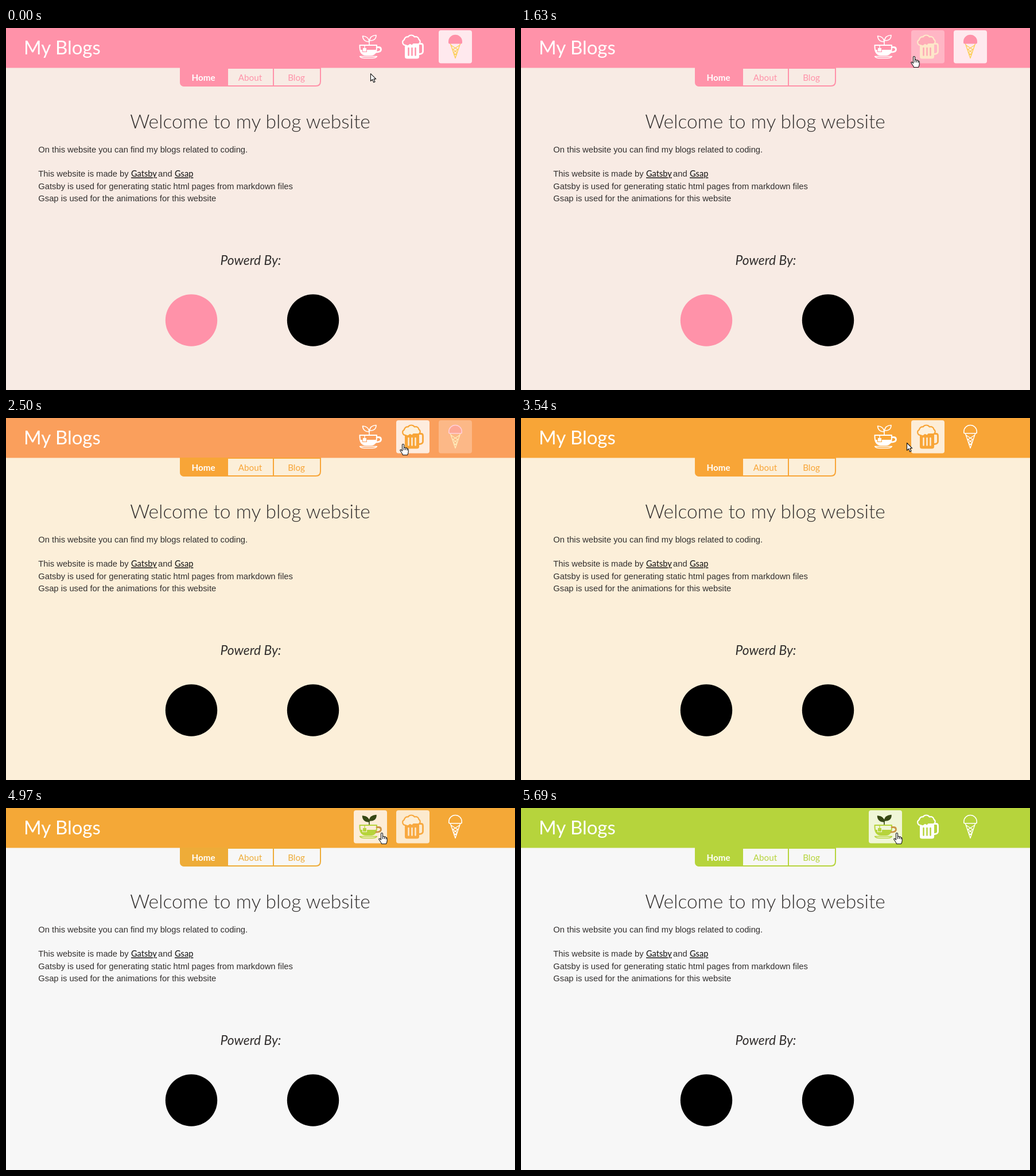
Write an HTML page that moves like this. It is 887 by 631 pixels and loops after 7.02 s.

```html
<!DOCTYPE html>
<html lang="en">
<head>
<meta charset="utf-8">
<title>My Blogs</title>
<style>
  html, body { margin: 0; width: 100%; height: 100%; overflow: hidden; }
  svg { display: block; width: 887px; height: 631px; }
  .deco { font-family: Lato, sans-serif; }
  .copy { font: 14.76px "Liberation Sans", Arial, sans-serif; fill: #322f2e; }
  .link { font: 14.6px Lato, sans-serif; fill: #111; text-decoration: underline; }
  .mid { text-anchor: middle; }
  .line { fill: none; stroke-linecap: round; stroke-linejoin: round; }
</style>
</head>
<body>
<svg viewBox="0 0 887 631">
  <rect id="page" width="887" height="631"/>
  <rect id="header" width="887" height="69.5"/>
  <text class="deco" x="31" y="46" font-size="33" fill="#fff">My Blogs</text>

  <g id="nav">
    <path d="M303 69H386V102H311Q303 102 303 94Z" fill="currentColor"/>
    <path d="M304 70H548V93Q548 101 540 101H312Q304 101 304 93ZM386 70V101M466 70V101"
      fill="none" stroke="currentColor" stroke-width="2"/>
    <g class="deco mid" font-size="15.2" fill="currentColor">
      <text x="344" y="91.5" fill="#fff" font-weight="700">Home</text>
      <text x="425.5" y="91.5">About</text>
      <text x="506" y="91.5">Blog</text>
    </g>
  </g>

  <g fill="#fff">
    <rect id="teaTile" x="606" y="4" width="58" height="57.5" rx="4"/>
    <rect id="beerTile" x="680" y="4" width="58" height="57.5" rx="4"/>
    <rect id="iceTile" x="754" y="4" width="58" height="57.5" rx="4"/>
  </g>

  <g id="tea" class="line" stroke-width="2">
    <g id="leaves" stroke-width="1.6">
      <path d="M633 24C625 24 622 20 621.5 14C629 14.500 632.500 18 633 24Z"/>
      <path d="M633.500 22C634 16 638 13 645 12.500C645 19 641 22.500 633.500 22Z"/>
      <path d="M633 22V29"/>
    </g>
    <path d="M616.500 30H646Q647 47 636 47H627Q616 47 616.500 30Z"/>
    <path id="brew" d="M617.500 38H621V42H629V38H645.500Q644 46.500 636 46.500H627Q618.500 46.500 617.500 38Z" stroke="none"/>
    <path d="M625 30V35" stroke-width="1.3"/>
    <rect id="tag" x="622" y="35" width="6" height="6" stroke="none"/>
    <path id="handle" d="M646 33.500H649Q653.500 33.500 653.500 37.500Q653.500 42 645 42" stroke-width="2.8"/>
    <path d="M616.500 49.500H646.500Q644 52.500 639 52.500H624Q619 52.500 616.500 49.500Z" stroke-width="1.4"/>
  </g>

  <g id="beer" class="line" stroke-width="2.2">
    <path id="mug" d="M695 29H720V50Q720 53.500 716 53.500H699Q695 53.500 695 50Z" stroke="none"/>
    <path d="M720 27.500H723.500Q726.500 27.500 726.500 31V41Q726.500 45 720.500 45.500" stroke-width="2.8"/>
    <path id="foam" d="M696 30A5 5 0 0 1 694 20.500A5.500 5.500 0 0 1 700.500 15.500A7 7 0 0 1 712 15.500A5.500 5.500 0 0 1 719.500 20A4.500 4.500 0 0 1 719 28H710Q708 32 704 29Q701 33 696 30Z"/>
    <path id="bars" d="M701.500 35V47.500M707.500 35V47.500M713.500 35V47.500" stroke-width="2.5"/>
  </g>

  <g id="ice" class="line" stroke-width="1.6">
    <path id="cone" d="M774.500 27.500L783 52.500L791.500 27.500M775.500 30L788 38M777.500 36.500L786.500 43M780 43.500L785 47.500M790.500 30L778 38M788.500 36.500L779.500 43M786 43.500L781 47.500" stroke-width="1.4"/>
    <path id="scoop" d="M773 26.800Q771.500 26.500 771.800 23.500A11.200 11 0 0 1 794.200 23.500Q794.500 26.500 793 26.800Z"/>
  </g>

  <g class="deco mid" fill="#322f2e">
    <text x="425.500" y="174.500" font-size="33.6" font-weight="300">Welcome to my blog website</text>
    <text x="426.500" y="412.500" font-size="22.800" font-style="italic">Powerd By:</text>
  </g>
  <g class="copy">
    <text x="56.300" y="216.700">On this website you can find my blogs related to coding.</text>
    <text x="56.300" y="259.400">This website is made by</text>
    <text x="265" y="259.400">and</text>
    <text x="56.300" y="280.700">Gatsby is used for generating static html pages from markdown files</text>
    <text x="56.300" y="302">Gsap is used for the animations for this website</text>
  </g>
  <text class="link" x="218" y="259.400">Gatsby</text>
  <text class="link" x="294" y="259.400">Gsap</text>

  <circle id="badge" cx="323" cy="509.500" r="45.200"/>
  <circle cx="535" cy="509.500" r="45.200"/>

  <circle id="ripple" r="9.500" fill="#e9ee3c"/>
  <g id="cursor" fill="#fff" stroke="#111" stroke-width="1.1" stroke-linejoin="round">
    <path id="arrow" d="M.5 .5V13.500L3.600 10.700L5.700 15.700L8 14.700L5.900 9.800H9.800Z"/>
    <path id="hand" d="M-1.500 1.500Q-1.500 .5 0 .5Q1.500 .5 1.500 2V8Q1.500 6 3 6.200Q4.500 6.300 4.500 8Q4.800 6.800 6 7Q7.300 7.200 7.300 9Q9.200 8 9.200 10.500V14Q9 16.500 7.500 19.500H-.5Q-1.500 16.500-4 13.500Q-6 10.800-4.500 10.300Q-3.200 10-1.500 12.500ZM1.500 8V11M4.500 8V11M7.300 9V11.500"/>
  </g>
</svg>
<script>
const LOOP = 7020;
const PINK = [255, 146, 169], ORANGE = [248, 165, 55], GREEN = [182, 212, 60];
const WHITE = [255, 255, 255], CREAM = [253, 237, 215], YELLOW = [252, 208, 92];
const LEAF = [55, 72, 22], CLAY = [202, 148, 68];

// theme switches and pointer arrivals, in ms
const TO_BEER = 2257, TO_TEA = 4955, OVER_BEER = 1550, OVER_TEA = 3850;

// pointer path: time, x, y
const PATH = [
  [0, 635, 79], [70, 632, 81], [140, 630, 82], [840, 631, 87], [930, 631, 87],
  [1070, 633, 92], [1160, 633, 92], [1550, 680, 53], [1630, 685, 49], [1870, 692, 45],
  [3310, 692, 45], [3460, 676, 43], [3540, 672, 43], [3620, 672, 43],
  [3850, 664, 41], [4250, 655, 43], [LOOP, 655, 43]
];

const svg = Object.fromEntries([...document.querySelectorAll("[id]")].map(el => [el.id, el]));
const set = (el, attrs) => { for (const key in attrs) el.setAttribute(key, attrs[key]); };
const mix = (a, b, p) => a.map((v, i) => v + (b[i] - v) * p);
const rgb = c => `rgb(${c.map(Math.round)})`;

function ease(t, start, length) {
  const left = 1 - Math.min(1, Math.max(0, (t - start) / length));
  return 1 - left * left;
}

function theme(t, length) {
  const warm = mix(PINK, ORANGE, ease(t, TO_BEER, length));
  return mix(warm, GREEN, ease(t, TO_TEA, length));
}

function pointer(t) {
  const i = PATH.findIndex(k => k[0] > t);
  const [t0, ...a] = PATH[i - 1], [t1, ...b] = PATH[i];
  return mix(a, b, (t - t0) / (t1 - t0));
}

function drawTea(p, header) {
  const main = rgb(mix(WHITE, GREEN, p));
  set(svg.tea, { stroke: main });
  set(svg.leaves, { stroke: rgb(mix(WHITE, LEAF, p)), fill: rgb(LEAF), "fill-opacity": p });
  set(svg.brew, { fill: main });
  set(svg.tag, { fill: main });
  set(svg.handle, { stroke: rgb(mix(WHITE, CLAY, p)) });
}

function drawBeer(p, header) {
  const main = rgb(mix(WHITE, ORANGE, p));
  set(svg.beer, { stroke: main });
  set(svg.mug, { fill: main });
  set(svg.foam, { fill: rgb(mix(header, [253, 241, 220], p)) });
  set(svg.bars, { stroke: rgb(mix(header, CREAM, p)) });
}

function drawIce(p) {
  set(svg.cone, { stroke: rgb(mix(WHITE, YELLOW, p)) });
  set(svg.scoop, { stroke: rgb(mix(WHITE, PINK, p)), fill: rgb(PINK), "fill-opacity": p });
}

function drawPointer(t) {
  const [x, y] = pointer(t);
  const hand = (t >= OVER_BEER && t < 3380) || t >= OVER_TEA;
  const click = (t >= 1950 && t < TO_BEER) || (t >= 4730 && t < TO_TEA);
  set(svg.cursor, { transform: `translate(${x} ${y})` });
  set(svg.arrow, { visibility: hand ? "hidden" : "visible" });
  set(svg.hand, { visibility: hand ? "visible" : "hidden" });
  set(svg.ripple, { cx: x, cy: y, opacity: click ? .75 : 0 });
}

function draw(t) {
  const header = theme(t, 570);
  set(svg.page, { fill: t < TO_BEER ? "#f8ebe4" : t < TO_TEA ? "#fcefd9" : "#f7f7f7" });
  set(svg.header, { fill: rgb(header) });
  set(svg.nav, { color: rgb(theme(t, 200)) });
  set(svg.badge, { fill: t < TO_BEER ? rgb(PINK) : "#000" });

  set(svg.iceTile, { opacity: .8 * (1 - ease(t, TO_BEER, 570)) });
  set(svg.beerTile, { opacity: .8 * ease(t, OVER_BEER, 350) * (1 - ease(t, TO_TEA, 570)) });
  set(svg.teaTile, { opacity: .8 * ease(t, OVER_TEA, 380) });

  drawIce(1 - ease(t, TO_BEER, 720));
  drawBeer(ease(t, OVER_BEER, 560) * (1 - ease(t, TO_TEA, 735)), header);
  drawTea(ease(t, OVER_TEA, 560));
  drawPointer(t);
}

const began = performance.now();
function tick() {
  draw((performance.now() - began) % LOOP);
  requestAnimationFrame(tick);
}
tick();
</script>
</body>
</html>
```
